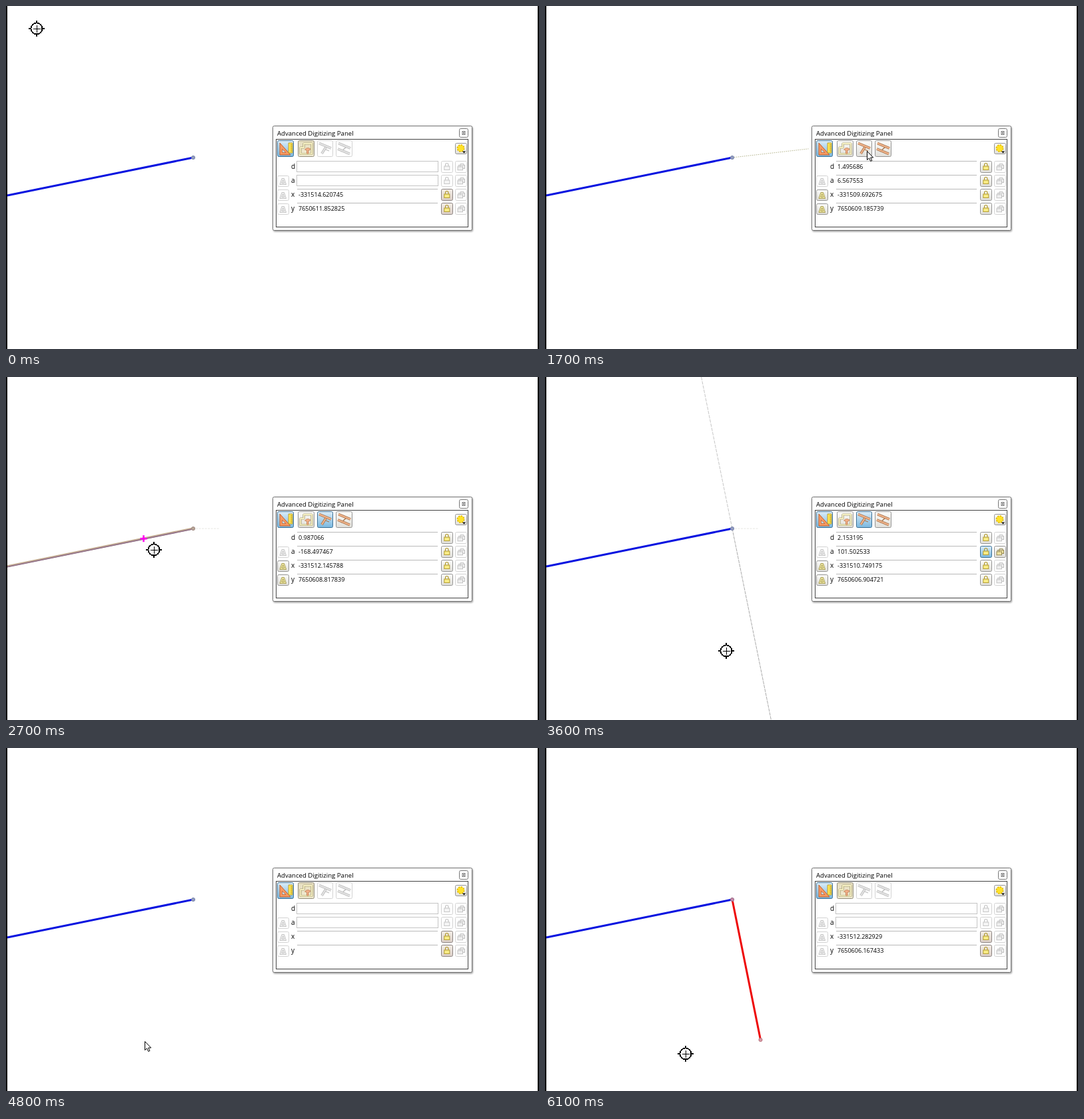
Write an HTML page that moves like this. It is 800 by 516 pixels and loops after 7100 ms.

```html
<!DOCTYPE html>
<html lang="en">
<head>
<meta charset="utf-8">
<title>Advanced Digitizing Panel</title>
<style>
  html, body { margin: 0; width: 100%; height: 100%; overflow: hidden; background: #fff; }
  svg { display: block; width: 800px; height: 516px; }
  text { font: 9px "Open Sans", "Noto Sans", sans-serif; fill: #000; white-space: pre; }
  .title { font-size: 9.6px; }
  .label { font-size: 10px; }
</style>
</head>
<body>
<svg viewBox="0 0 800 516">
  <defs>
    <linearGradient id="blue" x2="0" y2="1"><stop stop-color="#dcedf8"/><stop offset="1" stop-color="#7ab8e0"/></linearGradient>
    <linearGradient id="beige" x2="0" y2="1"><stop stop-color="#fcfcfa"/><stop offset="1" stop-color="#e0dfda"/></linearGradient>
    <linearGradient id="tan" x2="0" y2="1"><stop stop-color="#e6dec0"/><stop offset="1" stop-color="#f2ecd4"/></linearGradient>
    <linearGradient id="rose" x2="0" y2="1"><stop stop-color="#f4efe8"/><stop offset="1" stop-color="#dccfc8"/></linearGradient>
    <filter id="shadow" x="-5%" y="-5%" width="110%" height="115%">
      <feDropShadow dx="1" dy="1.5" stdDeviation="1.2" flood-opacity=".4"/>
    </filter>
  </defs>
  <g id="map"></g>
  <g id="panel"></g>
  <g id="cursor"></g>
</svg>
<script>
const LOOP = 7100, STEP = 100;
const CLICK = 800, PERP = 1800, HOVER = 2300, LOCK = 2800, RESET = 4700, READ = 5500, SAVED = 6000;
const END = { x: 281, y: 228 }, TIP = { x: 323.5, y: 439 };
const WORLD = { x: -331511.178546, y: 7650609.014671 };
const SCALE = 77;              // pixels per map unit
const ALONG = -168.497467;     // direction of the blue line
const ACROSS = ALONG + 90;

const layer = id => document.getElementById(id);

function polar(d, angle) {
  const r = angle * Math.PI / 180;
  return { x: d * Math.cos(r), y: d * Math.sin(r) };
}

// Each move brings the cursor and the map reading to a new place.
const start = { cursor: { x: 46, y: 34 }, point: { x: -3.442199, y: 2.838154 } };
const move = (from, to, x, y, point) => ({ from, to, cursor: { x, y }, point });
const moves = [
  move(0, 500, END.x, END.y, polar(0, 0)),
  move(700, 1500, 483, 218, polar(1.495686, 6.567553)),
  move(1700, 2300, 206, 246, polar(1.08, ALONG)),
  move(2300, 2700, 222, 260, polar(0.987066, ALONG)),
  move(2700, 3400, 272, 412, polar(2.153195, ACROSS)),
  move(3600, 4200, 241, 464, polar(2.627109, ACROSS)),
  move(4300, 4800, 208, 441, polar(2.69, ACROSS)),
  move(5400, READ, 211, 460, { x: -1.104383, y: -2.847238 })
];

const ease = p => p * p * (3 - 2 * p);
const mix = (a, b, p) => ({ x: a.x + (b.x - a.x) * p, y: a.y + (b.y - a.y) * p });

function pose(t) {
  return moves.reduce((now, m) => {
    const p = ease(Math.min(1, Math.max(0, (t - m.from) / (m.to - m.from))));
    return { cursor: mix(now.cursor, m.cursor, p), point: mix(now.point, m.point, p) };
  }, start);
}

const line = (x1, y1, x2, y2, stroke, width = 1, dash = "none") =>
  `<path d="M${x1} ${y1}L${x2} ${y2}" stroke="${stroke}" stroke-width="${width}" stroke-dasharray="${dash}" fill="none"/>`;
const box = (x, y, w, h, fill, stroke, r = 0) =>
  `<rect x="${x + .5}" y="${y + .5}" width="${w - 1}" height="${h - 1}" rx="${r}" fill="${fill}" stroke="${stroke}"/>`;
const text = (x, y, s, cls = "") => `<text x="${x}" y="${y}" class="${cls}">${s}</text>`;
const dot = (p, fill, stroke) => `<circle cx="${p.x}" cy="${p.y}" r="2.6" fill="${fill}" stroke="${stroke}"/>`;
const plus = (p, r, stroke, width) =>
  line(p.x - r, p.y, p.x + r, p.y, stroke, width) + line(p.x, p.y - r, p.x, p.y + r, stroke, width);

const looks = {
  off: ["#fff", "#d2d2d2"], on: ["url(#beige)", "#939393"], blue: ["url(#blue)", "#3b6f94"],
  tan: ["url(#tan)", "#908b78"], rose: ["url(#rose)", "#8a8280"]
};
const button = (x, y, w, h, look, icon) =>
  box(x, y, w, h, ...looks[look], 2) + `<g transform="translate(${x} ${y})">${icon}</g>`;

const ink = on => on ? "#a9774e" : "#bdbdbd";
const bar = (x1, y1, x2, y2, on) =>
  line(x1, y1, x2, y2, ink(on), 3.8) + line(x1, y1, x2, y2, on ? "#f3b48c" : "#e4e4e4", 2);

const icons = {
  setSquare: `<path d="M4 4V22H20Z" fill="#f79a62" stroke="#c4602c"/>
    <path d="M7.5 13V18.5H13Z" fill="#bcdcf0" stroke="#c4602c" stroke-width=".8"/>
    <path d="M17 4H23V19H17Z" fill="#ffe552" stroke="#b0941f" stroke-width=".8"/>
    <path d="M20 7h3m-3 3h3m-3 3h3m-3 3h3" stroke="#97801d" stroke-width=".8"/>`,
  construction: `<path d="M4 20.5V11H9V5H21V20.5Z" fill="none" stroke="#a39c72" stroke-width="3.2" stroke-linejoin="round"/>
    <path d="M4 20.5V11H9V5H21V20.5Z" fill="none" stroke="#f4eec0" stroke-width="1.8"/>
    <path d="M10.5 14Q14 9.5 19 13L17.500 15H16V20H13.5V15Z" fill="#f3b08a" stroke="#bd7a50" stroke-width=".8"/>`,
  perp: on => bar(14, 9, 7, 20, on) + bar(3, 4.5, 21, 12, on) + line(13, 14, 18, 16, ink(on), 1.2),
  parallel: on => line(17, 9, 8, 17, ink(on), 1.4) + bar(4, 4.5, 22, 12, on) + bar(3, 13, 21, 20.5, on),
  lock(on) {
    const c = on ? "#b39c32" : "#c6c6c6";
    return `<path d="M6.500 8V6Q6.500 3.500 8.700 3.500T11 6V8" fill="none" stroke="${c}" stroke-width="1.2"/>
      <rect x="4.800" y="8" width="8" height="5.500" fill="${on ? "#f8ec86" : "#f5f5f5"}" stroke="${c}"/>`;
  },
  delta(on) {
    const c = on ? "#a89d52" : "#c2c2c2";
    return `<path d="M4 13.500L7 4.500H10.500L13.500 13.500Z" fill="${on ? "#f6efae" : "#f6f6f6"}" stroke="${c}"/>
      <path d="M6.800 11.500L8.800 6.500L10.800 11.500Z" fill="none" stroke="${c}"/>`;
  },
  repeat(on) {
    const c = on ? "#978a55" : "#c2c2c2", f = on ? "#efe3a2" : "#f0f0f0";
    return `<path d="M8 7V4.500H13V7M5 9V6.500H9.500V9" fill="none" stroke="${c}"/>
      <rect x="7.500" y="6.500" width="7" height="5" fill="${f}" stroke="${c}"/>
      <rect x="4" y="8.800" width="7.500" height="5" fill="${f}" stroke="${c}"/>`;
  },
  gear: `<circle cx="8.500" cy="8" r="4.800" fill="#ffe52e" stroke="#e8c000" stroke-width="2.200" stroke-dasharray="2.400 1.300"/>
    <circle cx="8.500" cy="8" r="4.200" fill="#ffe22a"/><path d="M11 12.500h5l-2.500 3z" fill="#111"/>`
};

function row(i, name, value, { active, locked }) {
  const y = 233 + 21 * i, isPolar = i < 2, lit = active || !isPolar;
  const held = i === 1 && locked, relative = active && !isPolar;
  const lockLook = held ? "blue" : !lit ? "off" : active ? "on" : "rose";
  return (i ? button(407, y + 1, 18, 17, relative ? "on" : "off", icons.delta(relative)) : "") +
    text(428, y + 11.5, name, "label") +
    (lit ? line(437, y + .5, 648, y + .5, "#b9b9b9") + text(439, y + 12, value)
         : box(436, y, 213, 17, "#fff", "#c4c4c4")) +
    button(653, y, 18, 18, lockLook, icons.lock(lit)) +
    button(674, y, 18, 18, held ? "on" : "off", icons.repeat(held));
}

function drawPanel(s, values) {
  const { active, perp } = s, tool = active ? "on" : "off";
  return `<rect x="400.500" y="180.500" width="299" height="157" rx="2" fill="#fff" stroke="#707070" filter="url(#shadow)"/>` +
    text(407, 194.5, "Advanced Digitizing Panel", "title") +
    box(680, 184, 14, 14, "#fff", "#777", 2) +
    `<path d="M685 188.500h4v5h-4zM685 188.500l4 5m0-5l-4 5" fill="none" stroke="#666" stroke-width=".8"/>` +
    box(405, 200, 289, 133, "#fff", "#444") +
    button(407, 202, 25, 25, "blue", icons.setSquare) +
    button(438, 202, 25, 25, active ? "on" : "tan", icons.construction) +
    button(467, 202, 24, 25, perp ? "blue" : tool, icons.perp(active)) +
    button(495, 202, 25, 25, tool, icons.parallel(active)) +
    button(674, 206, 18, 17, "on", icons.gear) +
    ["d", "a", "x", "y"].map((name, i) => row(i, name, values[i], s)).join("");
}

function drawMap(s, point) {
  const at = { x: END.x + point.x * SCALE, y: END.y - point.y * SCALE };
  let out = "";
  if (s.locked) {
    out += line(234.6, 0, END.x, END.y, "#c6c6c6", 1, "5 1.5") +
      line(END.x, END.y, 339.4, 516, "#aaa", 1, "5 1");
  }
  out += s.snapped
    ? line(2, 284.8, END.x, 227.8, "#c4ad8e", 3.2) + line(2, 285.6, END.x, 228.6, "#94748c", 1.8)
    : line(2, 285, END.x, END.y, "#0814e0", 3);
  if (s.active) {
    out += s.perp
      ? line(285, 228, 320, 228, "#e6e6e2", 1, "3 1.5")
      : line(END.x, END.y, at.x, at.y, "#b5b58c", 1, "1.5 1.5");
  }
  if (s.saved) out += line(END.x, END.y, TIP.x, TIP.y, "#ee0808", 3) + dot(TIP, "#d99aa5", "#b87580");
  out += s.saved ? dot(END, "#c58ba8", "#9b6787")
    : s.snapped ? dot(END, "#b8a598", "#a08c84") : dot(END, "#929cc0", "#7b87ad");
  if (s.snapped) out += plus(at, 5, "#ff00f0", 2.6);
  return out + `<path d="M0 0h2v516h-2zM798 0h2v516h-2z" fill="#000"/>`;
}

function drawCursor(s, { x, y }) {
  const shape = x > 395 || s.pointer
    ? `<path d="M.5 .5V13.500L3.500 10.800L5.700 15.500L7.800 14.500L5.700 10H9.700Z" fill="#fff" stroke="#000"/>`
    : `<circle r="8.500" fill="none" stroke="#fff" stroke-width="4"/>
       <g fill="none" stroke="#000" shape-rendering="crispEdges"><circle r="8.500" stroke-width="1.800"/>
       <path d="M0 -12V-8M0 8V12M-12 0H-8M8 0H12" stroke-width="2"/>
       <path d="M-5 .5H6M.5 -5V6"/></g>`;
  return `<g transform="translate(${Math.round(x)} ${Math.round(y)})">${shape}</g>`;
}

function draw(t) {
  const active = t >= CLICK && t < RESET;
  const s = {
    active,
    perp: active && t >= PERP,
    locked: active && t >= LOCK,
    snapped: t >= HOVER && t < LOCK,
    pointer: t >= RESET && t < READ,
    saved: t >= SAVED
  };
  const { cursor, point } = pose(t);
  const angle = s.locked ? ACROSS + 180 : Math.atan2(point.y, point.x) * 180 / Math.PI;
  const values = [Math.hypot(point.x, point.y), angle, WORLD.x + point.x, WORLD.y + point.y]
    .map(v => s.pointer ? "" : v.toFixed(6));
  layer("map").innerHTML = drawMap(s, point);
  layer("panel").innerHTML = drawPanel(s, values);
  layer("cursor").innerHTML = drawCursor(s, cursor);
}

let shown = -1;
function tick() {
  const t = Math.floor(performance.now() % LOOP / STEP) * STEP;
  if (t !== shown) draw(shown = t);
  requestAnimationFrame(tick);
}
tick();
</script>
</body>
</html>
```
